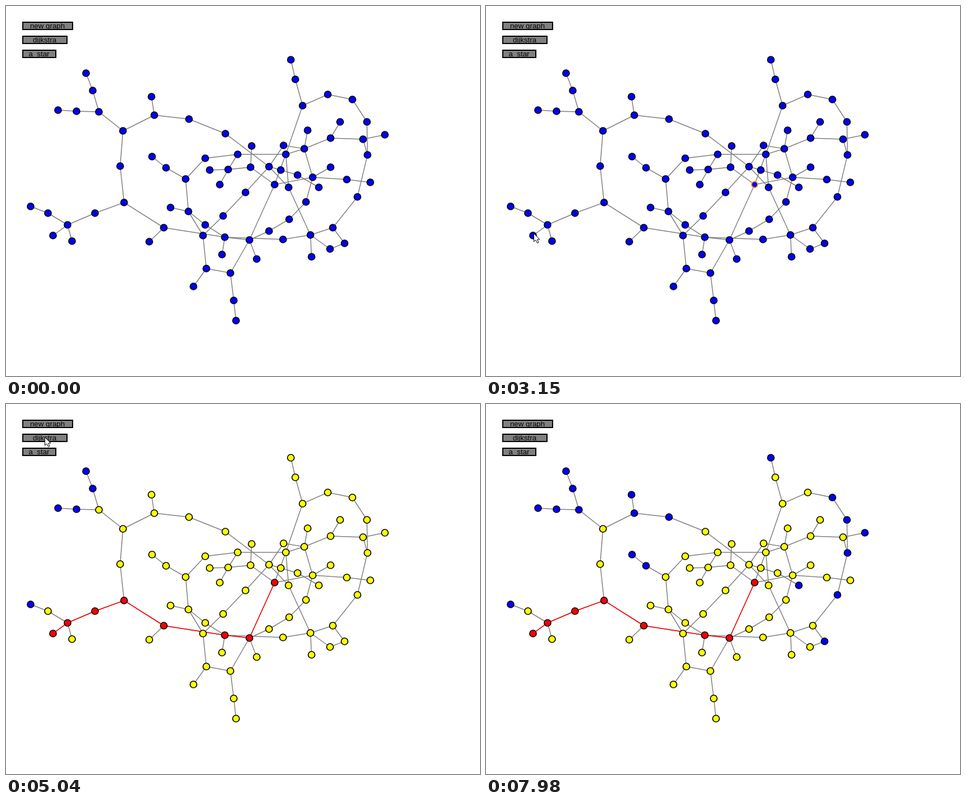
An HTML page with a canvas that plays this animation: 847x661 px, repeating every 8470 ms.

```html
<!DOCTYPE html>
<html lang="en">
<head>
<meta charset="utf-8">
<title>Graph search</title>
<style>
html, body { margin: 0; width: 100%; height: 100%; overflow: hidden; background: #fff; }
canvas { display: block; }
</style>
</head>
<body>
<canvas id="stage" width="847" height="661"></canvas>
<script>
const ctx = document.getElementById('stage').getContext('2d');
const LOOP = 8470, STEP = 70;

// Nodes grouped by how the two searches treat them, as x, y pairs
const route = [480,319, 435,418, 391,413, 282,396, 211,351, 159,370, 110,391, 84,410];
const unseen = [143,120, 155,151, 126,188, 93,186, 44,358];
const skipped = [
  166,189, 260,162, 265,195, 327,202, 261,269, 286,289, 509,96,
  619,167, 645,207, 677,230, 646,266, 628,341, 559,324, 605,424
];
const visited = [
  209,223, 204,286, 75,370, 118,420, 256,421, 392,228, 356,272, 414,265, 439,250,
  437,288, 397,292, 364,293, 382,319, 321,309, 326,367, 294,360, 356,391, 352,410,
  388,375, 428,333, 470,287, 386,444, 358,469, 335,501, 401,477, 407,526, 411,562,
  448,452, 470,402, 506,381, 536,350, 548,306, 580,288, 609,310, 651,315, 521,302,
  491,293, 505,324, 500,265, 496,249, 533,255, 539,222, 580,236, 597,207, 638,238,
  517,131, 530,178, 575,158, 495,417, 544,409, 546,448, 579,434, 584,396
];

const nodes = [];
[route, unseen, skipped, visited].forEach((list, group) => {
  for (let i = 0; i < list.length; i += 2) nodes.push({ x: list[i], y: list[i + 1], group });
});

// Each chain joins consecutive nodes
const path = [0, 1, 2, 3, 4, 5, 6, 7];
const chains = [
  path,
  [4, 28, 27, 13, 9, 8], [13, 10, 11], [27, 15, 14], [15, 16, 32, 47],
  [3, 31], [12, 29, 6, 30],
  [17, 18, 40, 33, 34, 65], [34, 37, 38], [39, 37, 36, 35], [36, 0, 58],
  [40, 41, 42], [41, 43, 2, 48], [41, 44, 45, 46, 47], [44, 49, 50], [49, 51, 1],
  [51, 52, 53], [54, 1, 55, 56, 57, 58, 67], [59, 58, 60, 61],
  [0, 65, 73], [47, 63, 62, 25], [47, 64, 65, 67], [47, 66, 67, 68],
  [67, 69, 70], [69, 71, 22], [71, 23], [64, 76, 77], [2, 75, 76, 79],
  [76, 78, 26, 79, 24, 23, 21, 20, 74, 73, 72, 19]
];

const buttons = [['new graph', 28, 91], ['dijkstra', 53, 81], ['a_star', 78, 61]];

// Pointer waypoints: time, x, y
const moves = [
  [210, 497, 300], [1050, 60, 36], [1330, 480, 315], [1680, 480, 315],
  [2590, 80, 407], [2730, 87, 406], [3010, 87, 406], [3080, 85, 406], [3220, 84, 406],
  [3920, 66, 122], [4060, 52, 92], [4200, 62, 76], [4340, 68, 60], [4480, 69, 59],
  [5250, 69, 59], [5810, 69, 82], [6020, 69, 83], [6160, 69, 84],
  [7700, 69, 84], [7910, 391, 0]
];
const firstPick = 1610, secondPick = 3220, runDijkstra = 4550, runStar = 6370;

function pointer(t) {
  if (t < moves[0][0] || t >= 7980) return null;
  const i = moves.findIndex(m => m[0] > t);
  if (i < 0) return moves[moves.length - 1].slice(1);
  const [t0, x0, y0] = moves[i - 1], [t1, x1, y1] = moves[i];
  const u = (t - t0) / (t1 - t0), k = u * u * (3 - 2 * u);
  return [Math.round(x0 + (x1 - x0) * k), Math.round(y0 + (y1 - y0) * k)];
}

function drawChain(chain, color) {
  ctx.beginPath();
  chain.forEach(n => ctx.lineTo(nodes[n].x, nodes[n].y));
  ctx.strokeStyle = color;
  ctx.lineWidth = 1.5;
  ctx.stroke();
}

function fillFor(group, t) {
  if (t < runDijkstra || group === 1) return '#00f';
  if (group === 0) return '#f00';
  return group === 2 && t >= runStar ? '#00f' : '#ff0';
}

function drawNode(node, i, t) {
  const picked = t < runDijkstra && (i === 0 && t >= firstPick || i === 7 && t >= secondPick);
  ctx.beginPath();
  ctx.arc(node.x, node.y, picked ? 5.5 : 6, 0, Math.PI * 2);
  ctx.fillStyle = fillFor(node.group, t);
  ctx.fill();
  ctx.strokeStyle = picked ? '#ff9820' : '#000';
  ctx.lineWidth = picked ? 2 : 1.7;
  ctx.stroke();
}

function drawButton([label, y, w]) {
  ctx.fillStyle = '#808080';
  ctx.fillRect(29, y, w, 15);
  ctx.strokeStyle = '#000';
  ctx.lineWidth = 2;
  ctx.strokeRect(30, y + 1, w - 2, 13);
  ctx.fillStyle = '#000';
  ctx.font = '13.33px "Liberation Sans", Arial, sans-serif';
  ctx.textAlign = 'center';
  ctx.fillText(label, 29 + w / 2 - 0.5, y + 12);
}

const arrow = new Path2D('M.5 .5V15L4 12L6.5 17.5L9 16.5L6.7 11H11Z');

function drawPointer(pos) {
  if (!pos) return;
  ctx.save();
  ctx.translate(...pos);
  ctx.fillStyle = '#fff';
  ctx.fill(arrow);
  ctx.strokeStyle = '#000';
  ctx.lineWidth = 1;
  ctx.stroke(arrow);
  ctx.restore();
}

function frame(now) {
  const t = Math.floor(now % LOOP / STEP) * STEP;
  ctx.fillStyle = '#fff';
  ctx.fillRect(0, 0, 847, 661);
  chains.forEach(chain => drawChain(chain, '#808080'));
  if (t >= runDijkstra) drawChain(path, '#f00');
  nodes.forEach((node, i) => drawNode(node, i, t));
  buttons.forEach(drawButton);
  drawPointer(pointer(t));
  requestAnimationFrame(frame);
}
requestAnimationFrame(frame);
</script>
</body>
</html>
```
